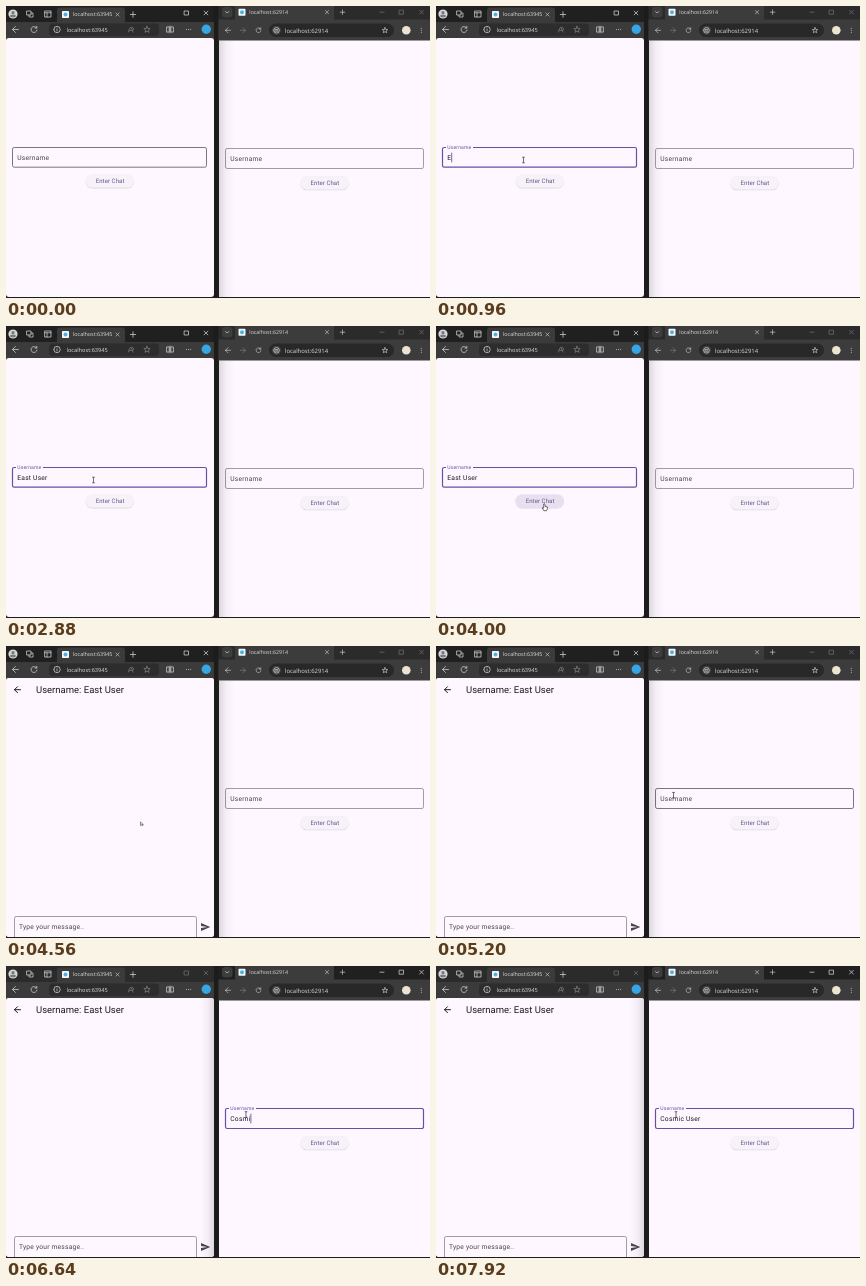
An HTML page for the animation above (8000 ms loop, 424 px wide and 292 px high).

```html
<!DOCTYPE html>
<html lang="en">
<head>
<meta charset="utf-8">
<title>Two chat windows</title>
<style>
  html, body { margin: 0; width: 100%; height: 100%; overflow: hidden; background: #111; }
  svg { display: block; width: 100vw; height: 100vh; }
  text { font-family: Roboto, sans-serif; white-space: pre; text-rendering: geometricPrecision; }
  .ui { font-family: "Open Sans", sans-serif; fill: #dcdcdc; }
  .body { font-size: 6.7px; letter-spacing: .21px; fill: #1d1b20; }
  .muted { fill: #49454f; }
  .title { font-size: 9.5px; fill: #1d1b20; }
  .button { font-size: 6.1px; letter-spacing: .05px; fill: #65588c; }
  .icon { fill: none; stroke: #d0d0d0; stroke-width: .75; stroke-linecap: round; stroke-linejoin: round; }
  .dim { stroke: #808080; }
  .dark { stroke: #1d1b20; stroke-width: 1; }
  .caret { stroke: #6750a4; stroke-width: .9; }
  .outline { fill: none; }
</style>
</head>
<body>
<svg id="stage" viewBox="0 0 424 292" preserveAspectRatio="none"></svg>
<script>
const LOOP = 8000, STEP = 80;
const PAGE = '#fef7ff', PURPLE = '#6750a4', LINE = '#8b8590', LINE_HOVER = '#5a555e';
const stage = document.getElementById('stage');
const $ = id => document.getElementById(id);

const rect = (x, y, w, h, fill, r = 0, more = '') =>
  `<rect x="${x}" y="${y}" width="${w}" height="${h}" rx="${r}" fill="${fill}" ${more}/>`;
const circle = (x, y, r, fill) => `<circle cx="${x}" cy="${y}" r="${r}" fill="${fill}"/>`;
const icon = (x, y, d, cls = '', size = 1) =>
  `<path class="icon ${cls}" transform="translate(${x} ${y}) scale(${size})" d="${d}"/>`;
const label = (x, y, str, cls, size) =>
  `<text x="${x}" y="${y}" class="${cls}" ${size ? `font-size="${size}"` : ''}>${str}</text>`;
const dots = (x, y, dx, dy) => [-1, 0, 1].map(i => circle(x + i * dx, y + i * dy, .5, '#d0d0d0')).join('');

const ICON = {
  back: 'M3 0H-3M0 -3L-3 0L0 3',
  forward: 'M-3 0H3M0 -3L3 0L0 3',
  reload: 'M2.6 -1.6A3 3 0 1 0 3 .6M2.8 -3.2V-1.4H1',
  close: 'M-1.9 -1.9L1.9 1.9M1.9 -1.9L-1.9 1.9',
  plus: 'M-2.7 0H2.7M0 -2.7V2.7',
  min: 'M-2 0H2',
  max: 'M-2 -2H2V2H-2Z',
  info: 'M-3.2 0A3.2 3.2 0 1 0 3.2 0A3.2 3.2 0 1 0 -3.2 0M0 -.2V1.5M0 -1.6V-1.5',
  star: 'M0 -3.2L.9 -1L3.2 -.9L1.4 .6L2 2.9L0 1.6L-2 2.9L-1.4 .6L-3.2 -.9L-.9 -1Z',
  pen: 'M-2.5 2.5L-1.5 -1L0 -2.5L2 2.5M-1.2 .8H1.4M1.5 -2.4A3 3 0 0 1 2.7 0',
  split: 'M-3 -2.6H-.8V2.6H-3ZM3 -2.6H.8V2.6H3ZM0 -3.5V3.5',
  tabs: 'M-3 -3H3V3H-3ZM-3 -1.2H3M-1 -1.2V3',
  stack: 'M-3 -3H1V1H-3ZM-1 1V3H3V-1H1',
  chevron: 'M-1.6 -.7L0 .9L1.6 -.7',
  site: 'M-2.8 0A2.8 2.8 0 1 0 2.8 0A2.8 2.8 0 1 0 -2.8 0M-1.2 -.7H1.2M-1.2 .8H1.2'
};

const favicon = (x, y) => rect(x - 3.5, y - 3.5, 7, 7, '#f3f8fc', .8) + circle(x, y, 2, '#4fb3e8');

const leftChrome = () =>
  rect(0, 0, 208, 33, '#202020', 0, 'id="stripL"') +
  rect(51, 1.5, 68, 18, '#3b3b3b', 3) + rect(0, 16, 208, 20, '#3b3b3b') +
  rect(43, 17.5, 110, 12.5, '#2d2d2d', 3.5) +
  circle(7, 8, 4.6, '#d6d6d6') + circle(7, 6.7, 1.6, '#777') + rect(4.2, 8.8, 5.6, 2.4, '#777', 1.2) +
  icon(24, 8, ICON.stack) + icon(42, 8, ICON.tabs) + favicon(59.5, 8.5) +
  label(67, 10.4, 'localhost:63945', 'ui', 5.4) +
  icon(111.5, 8.5, ICON.close, '', .85) + icon(127, 8.5, ICON.plus) +
  `<g id="ctrlL">${icon(180.5, 7, ICON.max)}${icon(200, 7, ICON.close)}</g>` +
  icon(9.5, 23.5, ICON.back) + icon(28, 23.5, ICON.reload) + icon(51, 23.5, ICON.info) +
  label(60.5, 25.7, 'localhost:63945', 'ui', 5.65) +
  icon(125, 23.5, ICON.pen, 'dim') + icon(141, 23.5, ICON.star, 'dim') + icon(164, 23.5, ICON.split) +
  dots(182.5, 23.5, 2.1, 0) + circle(200.3, 23.3, 4.7, '#35a5e3');

const rightChrome = () =>
  rect(212.5, 0, 212, 36, '#202020', 0, 'id="stripR"') +
  rect(216, 1, 10.5, 10.5, '#3d3d3d', 3) + icon(221.2, 6.2, ICON.chevron) +
  rect(229, -4, 99, 20, '#3c3c3c', 4) + rect(212.5, 13.5, 212, 21.5, '#3c3c3c') +
  rect(263, 17.5, 125, 13.5, '#282828', 6.7) +
  favicon(236, 6.2) + label(243.3, 8, 'localhost:62914', 'ui', 5.3) +
  icon(321, 6.2, ICON.close, '', .85) + icon(336.5, 6.2, ICON.plus, '', .85) +
  `<g id="ctrlR">${icon(376, 6.2, ICON.min)}${icon(395.5, 6.2, ICON.max)}${icon(415.5, 6.2, ICON.close)}</g>` +
  icon(222, 24.3, ICON.back, '', .85) + icon(237, 24.3, ICON.forward, 'dim', .85) +
  icon(252.5, 24.3, ICON.reload, '', .8) +
  circle(270.5, 24.3, 4.6, '#3f3f3f') + icon(270.5, 24.3, ICON.site) +
  label(279, 26.5, 'localhost:62914', 'ui', 5.9) + icon(379, 24.3, ICON.star, '', .85) +
  circle(400.3, 24.3, 4.3, '#eee3cf') + dots(415.3, 24.3, 0, 2);

const enterForm = (id, f, bx, by) =>
  `<path id="${id}Line" class="outline"/>
   <text id="${id}Label" class="body">Username</text>
   <text id="${id}Text" class="body" x="${f.x + 4.8}" y="${f.y + 12.3}"></text>
   <path id="${id}Caret" class="caret"/>
   ${rect(bx, by, 48.5, 13, '#f7f2fa', 6.5, `id="${id}Button" filter="url(#lift)"`)}
   ${label(bx + 10.2, by + 8.6, 'Enter Chat', 'button')}`;

const fields = {
  L: { x: 6.5, y: 141.5, w: 194, h: 19.7, clickAt: 390, caretOff: 2720, hoverAt: 0, name: 'East User',
       keys: [880, 1280, 1440, 1600, 1760, 2000, 2160, 2320, 2480] },
  R: { x: 219.5, y: 142.5, w: 198, h: 20, clickAt: 5545, caretOff: 7840, hoverAt: 5200, name: 'Cosmic User',
       keys: [6080, 6240, 6400, 6560, 6640, 6800, 6960, 7280, 7440, 7520, 7680] }
};

const chatPage = () =>
  rect(0, 32, 208, 260, PAGE) + icon(11.5, 43.7, ICON.back, 'dark') +
  label(30, 47, 'Username: ' + fields.L.name, 'title') +
  rect(8.5, 270.5, 182, 30, 'none', 1.8, `stroke="${LINE}" stroke-width=".8"`) +
  label(13, 283.2, 'Type your message..', 'body muted') +
  '<path fill="#49454f" d="M195 277L204.3 281L195 285V281.9L201.4 281L195 280.1Z"/>';

stage.innerHTML = `
<defs>
  <filter id="lift" x="-20%" y="-40%" width="140%" height="200%">
    <feDropShadow dx="0" dy=".5" stdDeviation=".6" flood-color="#000" flood-opacity=".28"/></filter>
  <linearGradient id="shade"><stop stop-color="#000" stop-opacity=".13"/>
    <stop offset=".45" stop-color="#000" stop-opacity=".04"/><stop offset="1" stop-color="#000" stop-opacity="0"/></linearGradient>
  <clipPath id="clipL">${rect(0, 32, 208, 259, '#000', 3)}</clipPath>
</defs>
${rect(0, 0, 424, 292, '#1c1c1c')}
${leftChrome()}
<g clip-path="url(#clipL)">
  ${rect(0, 32, 208, 260, PAGE)}
  <g id="entry">${enterForm('L', fields.L, 79.5, 168.5)}</g>
  <g id="chat">${chatPage()}</g>
  ${rect(0, 32, 14, 260, 'url(#shade)', 0, 'id="overL" transform="matrix(-1 0 0 1 208 0)"')}
</g>
${rightChrome()}
${rect(213, 34.5, 211, 256.5, PAGE)}
${enterForm('R', fields.R, 294.3, 170.3)}
${rect(213, 34.5, 15, 256.5, 'url(#shade)', 0, 'id="overR"')}
<g id="cursor">
  <path id="beam" fill="none" stroke="#333" stroke-width=".7" d="M-1.3 -2.8H1.3M0 -2.8V2.8M-1.3 2.8H1.3"/>
  <path id="arrow" fill="#fff" stroke="#222" stroke-width=".5" d="M-1 -1.6V2L0 1.2L.6 2.4L1.2 2.1L.7 1H1.9Z"/>
  <path id="hand" fill="#fff" stroke="#111" stroke-width=".6" d="M-.8 -2.4Q0 -3.2 .5 -2.2V-.2L2.8 .4V2.6L2 4.2H-.7L-2.3 1.3L-.8 1.6Z"/>
</g>`;

const clamp = v => Math.min(1, Math.max(0, v));
const ease = v => v * v * (3 - 2 * v);
const mix = (from, to, p) => `color-mix(in srgb, ${to} ${p * 100}%, ${from})`;
const show = (id, on) => $(id).setAttribute('visibility', on ? 'visible' : 'hidden');
const set = (id, attrs) => Object.entries(attrs).forEach(([k, v]) => $(id).setAttribute(k, v));

// Rounded outline with a notch in its top edge for the floating label
function outline({ x, y, w, h }, gap) {
  const r = 1.7, right = x + w, bottom = y + h, start = x + 3.5;
  return `M${start + gap} ${y}H${right - r}a${r} ${r} 0 0 1 ${r} ${r}V${bottom - r}a${r} ${r} 0 0 1 ${-r} ${r}` +
    `H${x + r}a${r} ${r} 0 0 1 ${-r} ${-r}V${y + r}a${r} ${r} 0 0 1 ${r} ${-r}H${start}`;
}

function drawField(id, t) {
  const f = fields[id];
  const p = ease(clamp((t - f.clickAt) / 150));
  const typed = f.name.slice(0, f.keys.filter(k => t >= k).length);
  set(id + 'Line', {
    d: outline(f, 27 * p),
    style: `stroke:${mix(t >= f.hoverAt ? LINE_HOVER : LINE, PURPLE, p)}`,
    'stroke-width': .8 + .4 * p
  });
  set(id + 'Label', {
    transform: `translate(${f.x + 4.8} ${f.y + 12.3 - 10.5 * p}) scale(${1 - .25 * p})`,
    style: `fill:${mix('#49454f', PURPLE, p)}`
  });
  const text = $(id + 'Text');
  text.textContent = typed;
  const caretX = f.x + 5.2 + (typed ? text.getComputedTextLength() : 0);
  set(id + 'Caret', { d: `M${caretX} ${f.y + 5.2}v9.6` });
  show(id + 'Caret', t >= f.clickAt && t < f.caretOff);
}

// time, x, y
const path = [
  [80, 87.5, 154], [3200, 87.5, 154], [3440, 91, 159], [3760, 105, 176], [4000, 108.5, 180.5],
  [4240, 108.5, 180.5], [4560, 135.5, 177.5], [4880, 168, 170], [5240, 240, 148.5], [LOOP, 240, 148.5]
];

function cursorAt(t) {
  const i = Math.max(1, path.findIndex(k => k[0] > t));
  const [t0, x0, y0] = path[i - 1], [t1, x1, y1] = path[i];
  const p = ease(clamp((t - t0) / (t1 - t0)));
  return [x0 + (x1 - x0) * p, y0 + (y1 - y0) * p];
}

const inside = (x, y, f) => x > f.x && x < f.x + f.w && y > f.y && y < f.y + f.h;

function drawCursor(t) {
  const [x, y] = cursorAt(t), formOpen = t < 4160;
  const onField = inside(x, y, fields.R) || formOpen && inside(x, y, fields.L);
  const onButton = formOpen && inside(x, y, { x: 79, y: 168, w: 49, h: 14 });
  set('cursor', { transform: `translate(${x} ${y})` });
  show('beam', t >= 80 && onField);
  show('hand', t >= 80 && onButton);
  show('arrow', t >= 80 && !onField && !onButton);
  set('LButton', { fill: onButton ? '#e8e0f1' : '#f7f2fa' });
}

const zoom = s => `translate(104 162) scale(${s}) translate(-104 -162)`;

function drawPages(t) {
  const p = clamp((t - 4080) / 300), e = 1 - (1 - p) ** 3;
  set('chat', { opacity: clamp(p * 3), transform: zoom(.85 + .15 * e) });
  set('entry', { transform: zoom(1 + .05 * e), display: p < 1 ? 'inline' : 'none' });
}

function drawFocus(t) {
  const right = t >= 5520;
  set('stripL', { fill: right ? '#2b2b2b' : '#202020' });
  set('stripR', { fill: right ? '#202020' : '#2b2b2b' });
  set('ctrlL', { opacity: right ? .4 : 1 });
  set('ctrlR', { opacity: right ? 1 : .4 });
  show('overL', right);
  show('overR', !right);
}

function frame() {
  const t = Math.floor(performance.now() % LOOP / STEP) * STEP;
  drawField('L', t);
  drawField('R', t);
  drawPages(t);
  drawCursor(t);
  drawFocus(t);
  requestAnimationFrame(frame);
}
frame();
</script>
</body>
</html>
```
